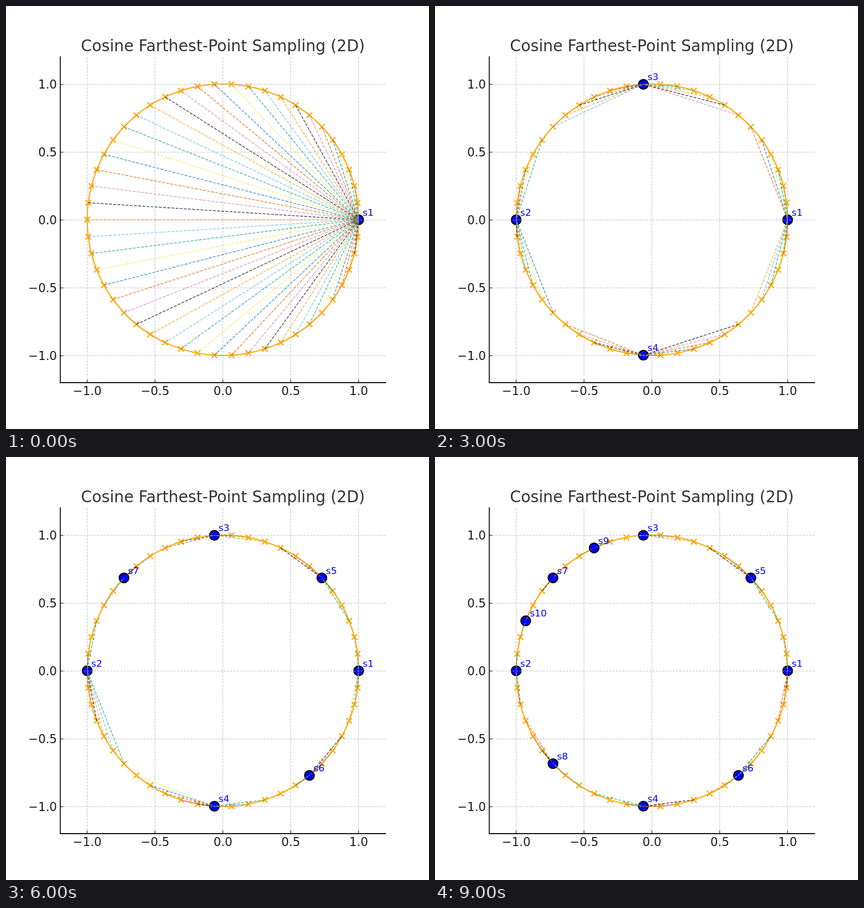
These frames come from a looping animation (748 by 748 pixels, 10000 ms). An HTML page with a canvas:

```html
<!DOCTYPE html>
<html lang="en">
<head>
<meta charset="utf-8">
<title>Cosine Farthest-Point Sampling</title>
<style>
  html, body { margin: 0; width: 100%; height: 100%; overflow: hidden; background: #fff; }
  canvas { display: block; }
</style>
</head>
<body>
<canvas id="stage" width="748" height="748"></canvas>
<script>
const ctx = document.getElementById('stage').getContext('2d');
const COUNT = 50, STEP_MS = 1000;
const CENTER_X = 383.6, CENTER_Y = 378, SCALE = 240;
const LEFT = 96, RIGHT = 672, TOP = 90, BOTTOM = 666;
const TICKS = [-1, -0.5, 0, 0.5, 1];
const CYCLE = ['#e69f00', '#56b4e9', '#009e73', '#f0e442', '#0072b2', '#d55e00', '#cc79a7', '#000'];

// Point indices in the order in which they are sampled.
const SAMPLES = [0, 25, 13, 37, 6, 43, 19, 31, 16, 22];
// Equidistant points join the lower neighbour, except these.
const JOINS_UPPER = new Set([3, 22, 28, 34]);

const toX = x => CENTER_X + SCALE * x;
const toY = y => CENTER_Y - SCALE * y;
const points = Array.from({ length: COUNT }, (_, i) => {
  const angle = 2 * Math.PI * i / COUNT;
  return { x: toX(Math.cos(angle)), y: toY(Math.sin(angle)) };
});

function line(x1, y1, x2, y2, color, width, dash = []) {
  ctx.strokeStyle = color;
  ctx.lineWidth = width;
  ctx.setLineDash(dash);
  ctx.beginPath();
  ctx.moveTo(x1, y1);
  ctx.lineTo(x2, y2);
  ctx.stroke();
}

function disc(x, y, radius, stroke, width, fill) {
  ctx.setLineDash([]);
  ctx.beginPath();
  ctx.arc(x, y, radius, 0, 2 * Math.PI);
  if (fill) {
    ctx.fillStyle = fill;
    ctx.fill();
  }
  ctx.strokeStyle = stroke;
  ctx.lineWidth = width;
  ctx.stroke();
}

function text(value, x, y, size, color, align) {
  ctx.font = `${size}px "DejaVu Sans", sans-serif`;
  ctx.fillStyle = color;
  ctx.textAlign = align;
  ctx.fillText(value, x, y);
}

function nearestSample(i, chosen) {
  const ahead = s => (s - i + COUNT) % COUNT;
  const upper = Math.min(...chosen.map(ahead));
  const lower = Math.min(...chosen.map(s => COUNT - ahead(s)));
  const useUpper = upper < lower || (upper === lower && JOINS_UPPER.has(i));
  return points[(i + (useUpper ? upper : COUNT - lower)) % COUNT];
}

function drawMarkers(chosen) {
  const r = 4.9;
  for (const { x, y } of points) {
    line(x - r, y - r, x + r, y + r, '#ffa500', 2.08);
    line(x - r, y + r, x + r, y - r, '#ffa500', 2.08);
  }
  for (const s of chosen) disc(points[s].x, points[s].y, 8.5, '#000', 2.08, '#00f');
}

function drawGrid() {
  ctx.globalAlpha = 0.7;
  for (const v of TICKS) {
    const x = Math.floor(toX(v)) + 0.5, y = Math.floor(toY(v)) + 0.5;
    line(x, BOTTOM, x, TOP, '#b0b0b0', 1.11, [4.11, 1.78]);
    line(LEFT, y, RIGHT, y, '#b0b0b0', 1.11, [4.11, 1.78]);
  }
  ctx.globalAlpha = 1;
}

function drawLinks(chosen) {
  const rest = points.map((_, i) => i).filter(i => !chosen.includes(i));
  ctx.globalAlpha = 0.7;
  rest.forEach((i, n) => {
    const from = points[i], to = nearestSample(i, chosen);
    line(from.x, from.y, to.x, to.y, CYCLE[n % CYCLE.length], 1.39, [5.14, 2.22]);
  });
  ctx.globalAlpha = 1;
}

function drawAxes() {
  const ink = '#1a1a1a';
  line(LEFT, TOP - 1, LEFT, BOTTOM + 1, ink, 1.8);
  line(LEFT - 1, BOTTOM, RIGHT, BOTTOM, ink, 1.8);
  for (const v of TICKS) {
    const x = Math.floor(toX(v)) + 0.5, y = Math.floor(toY(v)) + 0.5;
    const label = v.toFixed(1).replace('-', '\u2212');
    line(x, BOTTOM, x, BOTTOM - 5.5, ink, 1.1);
    line(LEFT, y, LEFT + 5.5, y, ink, 1.1);
    text(label, toX(v), 688, 20.83, ink, 'center');
    text(label, 90, toY(v) + 7.6, 20.83, ink, 'right');
  }
  text('Cosine Farthest-Point Sampling (2D)', CENTER_X, 80, 27.78, '#333', 'center');
}

function draw(now) {
  const step = Math.floor(now / STEP_MS) % SAMPLES.length;
  const chosen = SAMPLES.slice(0, step + 1);
  ctx.clearRect(0, 0, 748, 748);
  disc(CENTER_X, CENTER_Y, SCALE, '#ffa500', 2);
  drawMarkers(chosen);
  drawGrid();
  drawLinks(chosen);
  drawAxes();
  chosen.forEach((s, n) => {
    text(`s${n + 1}`, points[s].x + 7.2, points[s].y - 7.2, 16.67, '#00f', 'left');
  });
}

const start = performance.now();
function tick() {
  draw(performance.now() - start);
  requestAnimationFrame(tick);
}
tick();
</script>
</body>
</html>
```
